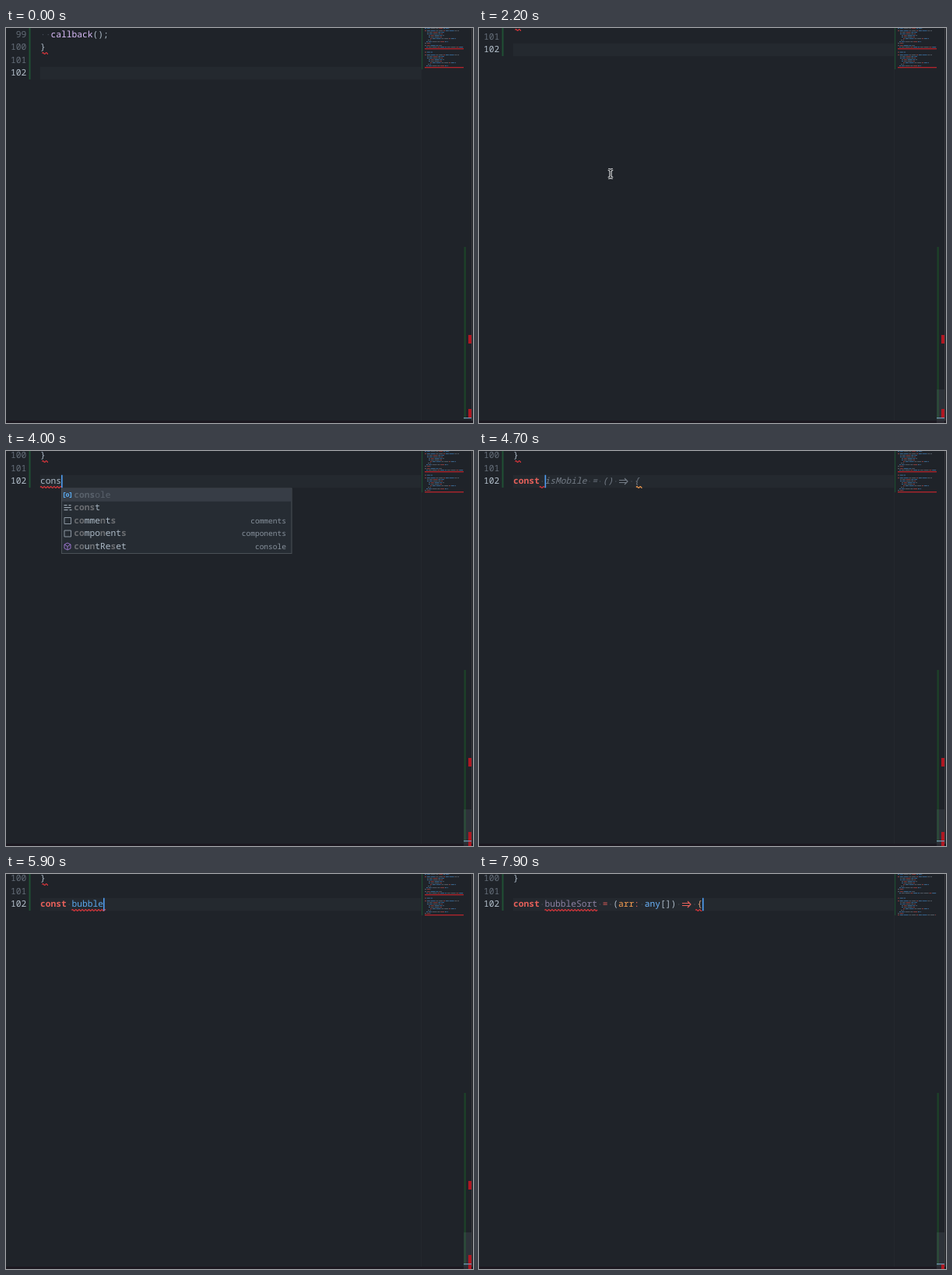
An HTML page with a canvas for the animation above (8000 ms loop, 600x507 px).

```html
<!DOCTYPE html>
<html lang="en">
<head>
<meta charset="utf-8">
<title>Editor typing</title>
<style>
  html, body { margin: 0; width: 100%; height: 100%; overflow: hidden; background: #1f2329; }
  canvas { display: block; width: 600px; height: 507px; }
</style>
</head>
<body>
<canvas id="stage" width="600" height="507"></canvas>
<script>
const ctx = document.getElementById('stage').getContext('2d');
const LOOP = 8000, STEP = 100;
const CHAR = 6.75, ROW = 16.5, LEFT = 44;
const FONT = '11.25px "Noto Sans Mono", "DejaVu Sans Mono", monospace';
const SMALL = '9.55px "Noto Sans Mono", "DejaVu Sans Mono", monospace';
const C = {
  bg: '#1f2329', text: '#adbac7', dim: '#646d78', dot: '#48505a', red: '#e5605a',
  blue: '#5aa9ee', purple: '#9470c6', orange: '#f69d50', error: '#d9363b', ghost: '#737b85'
};

// [time, typed text]
const typing = [
  [0, ''], [3300, 'c'], [3500, 'co'], [3800, 'con'], [4000, 'cons'], [4200, 'const'],
  [4400, 'const '], [5000, 'const b'], [5100, 'const bu'], [5400, 'const bub'],
  [5600, 'const bubb'], [5700, 'const bubbl'], [5900, 'const bubble'],
  [6200, 'const bubbleS'], [6400, 'const bubbleSo'], [6600, 'const bubbleSor'],
  [6700, 'const bubbleSort'], [7400, 'const bubbleSort = (arr: any[]) => {']
];
// [from, to, suggested text]
const hints = [
  [4600, 5000, 'isMobile = () => {'],
  [7000, 7400, ' = (arr: any[]) => {']
];
// [time, y of the active line]
const scroll = [[1200, 58], [2000, 28], [2300, 28], [2700, 39]];

// [icon, label, detail]
const words = [
  ['cube', 'confirm', ''], ['value', 'console', ''], ['key', 'const', ''], ['key', 'continue', ''],
  ['box', 'comments', 'comments'], ['box', 'commit', 'commit'],
  ['box', 'component', 'componentWord'], ['box', 'components', 'components'],
  ['box', 'computed', 'computed'], ['box', 'computedV2', 'computedV2'],
  ['cube', 'count', 'console'], ['cube', 'countReset', 'console']
];
const names = [
  ...Array(2).fill(['box', 'bundleRendererRenderToSt…', 'bundleRenderer…']),
  ...['beforeUnmount', 'beforeUpdate', 'createBundleRenderer', 'onBeforeUnmount',
    'onBeforeUpdate', 'beforeMount', 'beforeRouteEnter', 'beforeRouteLeave', 'onBeforeMount']
    .map(name => ['box', name, name])
];

const col = n => LEFT + n * CHAR;

function rect(x, y, w, h, color) {
  ctx.fillStyle = color;
  ctx.fillRect(x, y, w, h);
}

function line(color, width, ...points) {
  ctx.strokeStyle = color;
  ctx.lineWidth = width;
  ctx.beginPath();
  points.forEach(([x, y]) => ctx.lineTo(x, y));
  ctx.stroke();
}

function write(str, x, y, color, style = '', font = FONT) {
  ctx.font = style + ' ' + font;
  ctx.fillStyle = color;
  ctx.fillText(str, x, y + 3.4);
}

function writeRight(str, x, y, color, font = FONT) {
  ctx.textAlign = 'right';
  write(str, x, y, color, '', font);
  ctx.textAlign = 'left';
}

function squiggle(x, w, y, color = C.error) {
  const points = [];
  for (let i = 0; i <= w; i += 0.5) points.push([x + i, y - Math.sin(i * 1.5) * 0.9]);
  line(color, 1.2, ...points);
}

function arrow(x, y, color) {
  line(color, 1, [x + 1, y - 1.5], [x + 10, y - 1.5]);
  line(color, 1, [x + 1, y + 1.5], [x + 10, y + 1.5]);
  line(color, 1.1, [x + 8, y - 4], [x + 12, y], [x + 8, y + 4]);
}

// Writes code token by token on the character grid, with dots for blanks.
function code(str, start, y, colorOf, style = '') {
  for (const m of str.matchAll(/\w+|=>|[^\w]/g)) {
    const x = col(start + m.index), token = m[0];
    if (token === ' ') rect(x + 2.9, y - 0.6, 1.2, 1.2, C.dot);
    else if (token === '=>') arrow(x, y, colorOf(token));
    else write(token, x, y, colorOf(token), token === 'const' ? '600' : style);
  }
}

function scrollAt(t) {
  for (let i = 1; i < scroll.length; i++) {
    const [t0, y0] = scroll[i - 1], [t1, y1] = scroll[i];
    if (t < t1) {
      const p = Math.max(0, (t - t0) / (t1 - t0));
      return y0 + (y1 - y0) * p * p * (3 - 2 * p);
    }
  }
  return scroll.at(-1)[1];
}

// Indices of the label's letters that match the query in order, or null.
function match(label, query) {
  const hits = [];
  let at = -1;
  for (const ch of query) {
    at = label.toLowerCase().indexOf(ch, at + 1);
    if (at < 0) return null;
    hits.push(at);
  }
  return hits;
}

function icon(kind, x, y, faded) {
  const tint = color => faded ? '#565e68' : color;
  if (kind === 'box') {
    ctx.strokeStyle = tint('#8b96a1');
    ctx.lineWidth = 1;
    ctx.strokeRect(x + 0.5, y - 4, 8.5, 8);
  } else if (kind === 'cube') {
    const c = tint(C.purple);
    line(c, 1, [x + 4.5, y - 4.5], [x + 8.5, y - 2.5], [x + 8.5, y + 2.5], [x + 4.5, y + 4.5],
      [x + 0.5, y + 2.5], [x + 0.5, y - 2.5], [x + 4.5, y - 4.5]);
    line(c, 1, [x + 0.5, y - 2.5], [x + 4.5, y], [x + 8.5, y - 2.5]);
    line(c, 1, [x + 4.5, y], [x + 4.5, y + 4.5]);
  } else if (kind === 'value') {
    line(C.blue, 1.2, [x + 2, y - 3], [x, y - 3], [x, y + 3], [x + 2, y + 3]);
    line(C.blue, 1.2, [x + 7, y - 3], [x + 9, y - 3], [x + 9, y + 3], [x + 7, y + 3]);
    ctx.beginPath();
    ctx.arc(x + 4.5, y, 1.7, 0, 7);
    ctx.stroke();
  } else {
    [[0, 4], [6, 3], [0, 9], [0, 5], [7, 3]].forEach(([dx, w], i) =>
      rect(x + dx, y - 4 + [0, 0, 3, 6, 6][i], w, 1.2, '#9aa5b0'));
  }
}

function popup(list, query, x, y) {
  const rows = list.map(item => [...item, match(item[1], query)]).filter(row => row[3]);
  if (!rows.length) return;
  const top = y + 8.5, width = 296.5, height = rows.length * ROW + 2;
  rect(x, top, width, height, '#4a5056');
  rect(x + 1, top + 1, width - 2, height - 2, '#262c33');
  rows.forEach(([kind, label, detail, hits], i) => {
    const cy = top + 9 + i * ROW, selected = i === 0;
    if (selected || i === 8) {
      rect(x + 1, cy - ROW / 2, width - 2, ROW, selected ? '#373d46' : '#2d303a');
    }
    icon(kind, x + 3.5, cy, selected);
    [...label].forEach((ch, n) => {
      const hit = hits.includes(n);
      const color = selected ? '#59616b' : hit ? '#6b6d71' : C.text;
      write(ch, x + 16.2 + n * CHAR, cy, color, hit ? 'bold' : '');
    });
    writeRight(detail, x + 289, cy - 0.3, selected ? '#59616b' : '#88929d', SMALL);
  });
  return rows[0][1];
}

function docs(x, y) {
  rect(x, y + 8.5, 600 - x, 51, '#4a5056');
  rect(x + 1, y + 9.5, 599 - x, 49, '#23282f');
  write('just a word (Fen 5 Phrasing)', x + 4, y + 20, '#89929c');
  write('bundleRenderer.renderToStream', x + 4, y + 47, C.text);
}

function miniRow(x, y, w, seed) {
  const inks = ['#b04a4a', '#3f7fb8', '#69737e', '#4a88bd', '#646e79'];
  for (let dx = 0, n = seed; dx < w; n++) {
    const len = Math.min(w - dx, 2 + (n * 7 + seed * 3) % 5);
    ctx.globalAlpha = 0.65;
    rect(538 + x + dx, y, len, 1.1, inks[(n * 3 + seed) % 5]);
    dx += len + 0.8;
  }
  ctx.globalAlpha = 1;
}

function minimap(typed, fixed) {
  rect(533, 0, 1, 504, '#23282e');
  rect(534, 0, 1.2, 53, '#1d4a30');
  const block = [[0, 0, 44], [3, 2, 22], [3, 4, 20], [5, 6, 20], [5, 8, 17], [7, 10, 33], [4, 12, 4],
    [2, 14, 28], [0, 16, 8]];
  miniRow(0, 0, 32, 2);
  for (const top of [3, 34]) block.forEach(([x, y, w], i) => miniRow(x, top + y, w, i));
  miniRow(0, 22, 22, 3);
  miniRow(2, 24, 48, 4);
  miniRow(0, 30.5, 10, 5);
  if (fixed) return miniRow(0, 52, 49, 5);
  rect(538, 26, 50, 1.3, '#b3252c');
  rect(538, typed ? 52 : 50, 50, 1.3, '#b3252c');
}

function ruler(t, y, typed, fixed) {
  rect(588.5, 281, 2.3, 221, '#1d4229');
  if (t >= 600) {
    const top = 460 + (39 - y) * 0.36;
    rect(588, top, 10, 507 - top, 'rgba(140,152,165,.13)');
  }
  if (!fixed) {
    rect(594, 394, 4, 11, '#b01822');
    rect(594, 489, 4, typed ? 18 : 12, '#b01822');
  } else rect(594, 501, 4, 6, '#b01822');
  rect(588, 500, 10, 1.2, '#7396b5');
  rect(598, 0, 1, 504, '#3a3a3d');
}

function pointer(t) {
  if (t < 500 || t >= 3300) return;
  const rest = Math.pow(1 - Math.min(1, (t - 500) / 600), 2);
  const x = 169 + 420 * rest, y = 187 + 70 * rest;
  for (const [color, width] of [['#e8eaec', 3.2], ['#15181c', 1.1]]) {
    line(color, width, [x - 3, y - 5.5], [x - 1, y - 5], [x, y - 4], [x, y + 4], [x - 1, y + 5], [x - 3, y + 5.5]);
    line(color, width, [x + 3, y - 5.5], [x + 1, y - 5], [x, y - 4]);
    line(color, width, [x, y + 4], [x + 1, y + 5], [x + 3, y + 5.5]);
  }
}

function errors(typed, y, fixed, hint) {
  const under = y + 7.5;
  if (!fixed) squiggle(46.5, 7.5, under - 2 * ROW);
  if (!typed) return;
  const name = typed.slice(6).match(/^\w*/)[0];
  if (typed.length < 6) squiggle(LEFT, typed.length * CHAR, under);
  else if (!name) squiggle(col(5), CHAR, under);
  else {
    if (name.length < 4) squiggle(LEFT, 5 * CHAR, under);
    squiggle(col(6), name.length * CHAR + (name.length < 10 ? 3 : 0), under);
  }
  if (hint && !name) squiggle(202, 7.5, under, C.orange);
  if (fixed) squiggle(col(35) - 2, 8, under);
}

function draw(t) {
  const y = scrollAt(t);
  const typed = typing.findLast(([at]) => t >= at)[1];
  const hint = hints.find(([from, to]) => t >= from && t < to)?.[2];
  const fixed = t >= 7500, done = t >= 7400;
  const caret = col(typed.length);

  rect(0, 0, 600, 507, C.bg);
  rect(LEFT, y - ROW / 2, 489, ROW, '#24292f');
  rect(29.5, 0, 2, y + 8, '#205034');

  for (let n = 99; n <= 102; n++) {
    writeRight(n, 26.2, y + (n - 102) * ROW, n === 102 ? '#b4c0cc' : C.dim);
  }
  code('  callback();', 0, y - 3 * ROW, token => token === 'callback' ? '#dcbdfb' : C.text);
  write('}', LEFT, y - 2 * ROW, C.text);

  const nameColor = done ? '#8c82a3' : C.blue;
  const inks = { const: C.red, '=': C.red, '=>': C.red, ':': C.red, arr: C.orange, any: '#6cb6ff', '{': '#d9a27c' };
  code(typed, 0, y, token => inks[token] || (token.startsWith('b') ? nameColor : C.text));
  if (hint) code(hint, typed.length, y, () => C.ghost, 'italic');

  errors(typed, y, fixed, hint);
  if (typed || t % 1000 >= 500) rect(caret, y - ROW / 2, 1.6, ROW, '#4f9cf0');

  rect(0, 504, 600, 3, '#1b1820');
  minimap(typed, fixed);
  ruler(t, y, typed, fixed);

  if (t >= 3300 && t < 4400) popup(words, typed, caret, y);
  if (t >= 5000 && t < 5600 && popup(names, typed.slice(6), caret, y) && t >= 5200) {
    docs(caret + 296, y);
  }
  pointer(t);
}

ctx.textRendering = 'geometricPrecision';
ctx.lineJoin = 'round';
const start = performance.now();
function frame() {
  const t = (performance.now() - start) % LOOP;
  draw(Math.floor(t / STEP) * STEP);
  requestAnimationFrame(frame);
}
frame();
</script>
</body>
</html>
```
